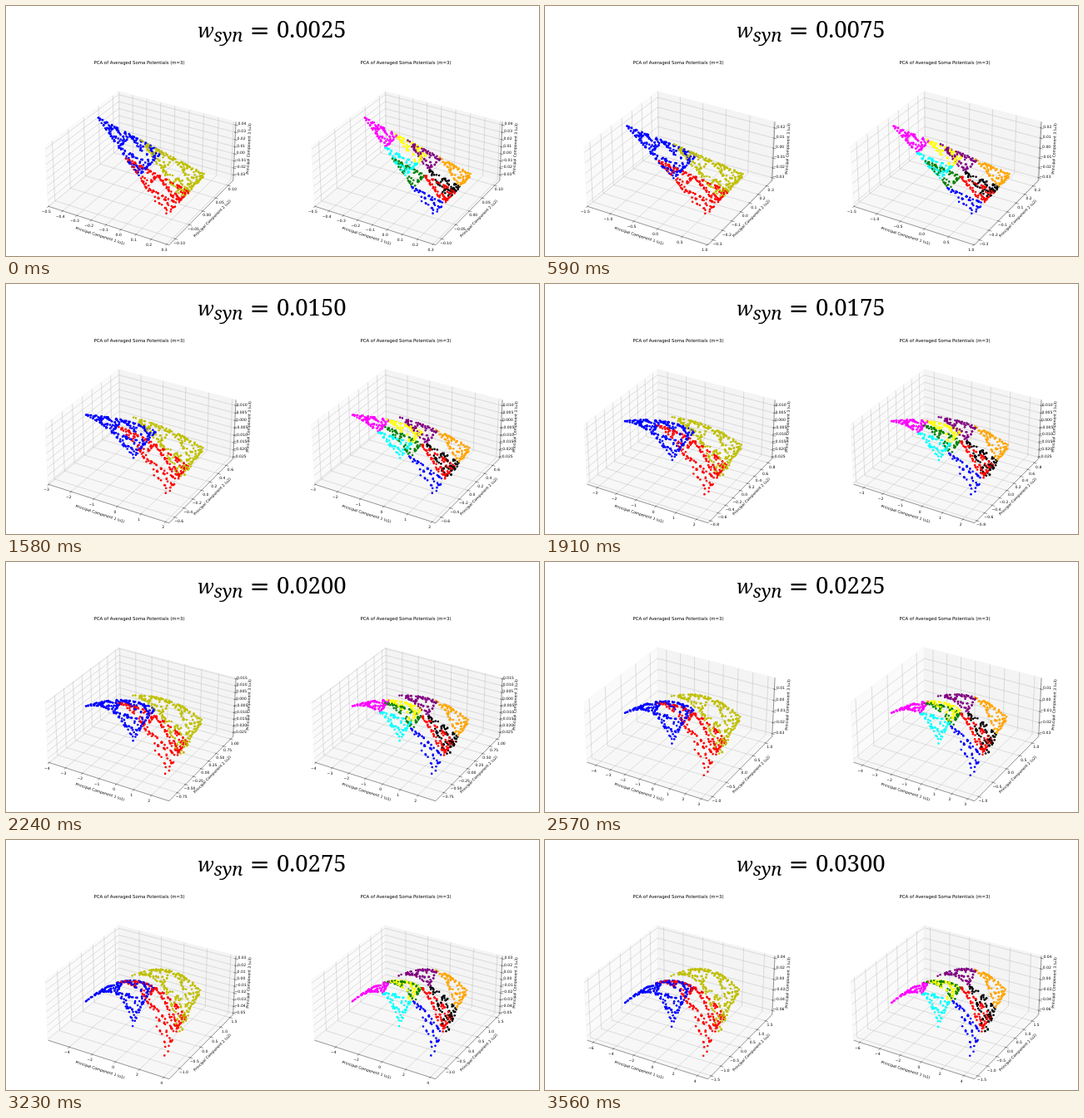
Animation of 640 by 301 pixels, one loop 3.89 s. Source, as an HTML page with a canvas:

```html
<!DOCTYPE html>
<html lang="en">
<head>
<meta charset="utf-8">
<title>Averaged potentials</title>
<style>
  html, body { margin: 0; width: 100%; height: 100%; overflow: hidden; background: #fff; }
  canvas { display: block; }
</style>
</head>
<body>
<canvas id="stage" width="640" height="301"></canvas>
<script>
const ctx = document.getElementById('stage').getContext('2d');
const LOOP = 3890, FIRST = 260, STEP = 330, STEPS = 12, PANEL = 320;
const SANS = '"DejaVu Sans", sans-serif', SERIF = '"Noto Serif", serif';
const COLORS3 = ['#00f', '#bfbf00', '#f00'];
const COLORS9 = ['#f0f', '#ff0', '#0ff', '#800080', '#ffa500', '#000', '#008000', '#f00', '#00f'];

const mix = (a, b, f) => a.map((v, i) => v + (b[i] - v) * f);
const smooth = f => f * f * (3 - 2 * f);

// Axis limits [low, high] for step n = 1..12: x and y widen, z narrows and widens again.
function limits(n) {
  const m = n - 6.5;
  return [
    [-.503 * n - 2e-7 * n ** 6, .345 * n + .0005 * n ** 3 - .03],
    [-.008 - .113 * n - .00017 * n ** 3, .12 * n + .00026 * n ** 3],
    [-.0256 - m * m * (.0009 + .00009 * m), .0135 + .00102 * m * m]
  ];
}

// The whole triangle at the start and fully bent.
const START = [[95, 146], [240, 203], [192, 254]];
const BENT = [[95, 197], [235, 182], [189, 272]];
// How far corner i of sheet s rises, and how far the edges 01, 02, 12 bulge.
const LIFT = [[0, 10, 12], [27, 0, -9], [55, 4, 0]];
const BULGE = [[6, -34], [18, -55], [0, -15]];
const EDGES = [[0, 1], [0, 2], [1, 2]];

// Each sheet is a smaller copy of the triangle, bent as a quadratic patch.
function makeSheets(n) {
  const s = smooth(Math.max(0, (n - 2.5) / 9.5));
  const bend = s ** 1.25, rise = s ** .6, settle = Math.exp(.9 - .9 * n);
  const tips = START.map((p, i) => mix(p, BENT[i], bend));
  tips[0] = [tips[0][0] + 15 * settle, tips[0][1] - 12 * settle];
  return LIFT.map((lifts, sheet) => {
    const corners = tips.map((tip, i) => {
      const [x, y] = mix(tips[sheet], tip, .6);
      return i === sheet ? tip : [x, y - lifts[i] * rise];
    });
    const controls = EDGES.map(([a, b], i) =>
      mix(corners[a], corners[b], .5).map((v, k) => v + BULGE[i][k] * bend));
    return [...corners, ...controls];
  });
}

function onSheet(sheet, [a, b, c]) {
  const weights = [a * a, b * b, c * c, 2 * a * b, 2 * a * c, 2 * b * c];
  return [0, 1].map(k => weights.reduce((sum, w, i) => sum + w * sheet[i][k], 0));
}

function seeded(seed) {
  return () => {
    seed = (seed + 0x6D2B79F5) | 0;
    let t = Math.imul(seed ^ (seed >>> 15), 1 | seed);
    t = (t + Math.imul(t ^ (t >>> 7), 61 | t)) ^ t;
    return ((t ^ (t >>> 14)) >>> 0) / 4294967296;
  };
}

// Chaos game on a triangle; the last two choices pick the colours.
function makePoints(count) {
  const random = seeded(11), points = [];
  let rest = [1, 0, 0], last = 0;
  for (let n = -20; n < count; n++) {
    const sheet = Math.floor(random() * 3);
    if (n >= 0) points.push({ sheet, sub: sheet * 3 + last, rest });
    const corner = [0, 1, 2].map(i => +(i === sheet));
    rest = mix(corner, rest, .52);
    last = sheet;
  }
  return points;
}
const points = makePoints(680);

// Box coordinates 0..1 to the stage: azimuth -60, elevation 30.
function project([u, v, w]) {
  const x = (u - .5) * 1.22, y = (v - .5) * 1.22, z = (w - .5) * .61;
  const depth = 10 - (.433 * x - .75 * y + .5 * z);
  return [163.8 + 1353 * (.866 * x + .5 * y) / depth,
          190.1 - 1353 * (-.25 * x + .433 * y + .866 * z) / depth];
}

function line(...corners) {
  ctx.beginPath();
  corners.forEach(c => ctx.lineTo(...project(c)));
  ctx.stroke();
}

function pane(color, ...corners) {
  ctx.fillStyle = color;
  line(...corners, corners[0]);
  ctx.fill();
}

function label(text, x, y, size, degrees = 0) {
  ctx.save();
  ctx.translate(x, y);
  ctx.rotate(degrees * Math.PI / 180);
  ctx.font = `${size}px ${SANS}`;
  ctx.textAlign = 'center';
  ctx.textBaseline = 'middle';
  ctx.fillStyle = '#000';
  ctx.fillText(text, 0, 0);
  ctx.restore();
}

// Round tick values, at most nine intervals.
function ticks([lo, hi]) {
  const raw = (hi - lo) / 9, power = 10 ** Math.floor(Math.log10(raw));
  const step = [1, 2, 2.5, 5, 10].find(m => m * power >= raw) * power;
  const digits = (String(+step.toPrecision(3)).split('.')[1] || '').length;
  const list = [];
  for (let k = Math.ceil(lo / step); k * step <= hi; k++) {
    const text = Math.abs(k * step).toFixed(digits);
    list.push({ at: (k * step - lo) / (hi - lo), text: (k < 0 ? '\u2212' : '') + text });
  }
  return list;
}

const AXES = [
  { grid: f => [[f, 0, 0], [f, 1, 0], [f, 1, 1]], mark: f => [[f, .01, 0], [f, -.02, 0]],
    spot: f => [f, 0, 0], shift: [-2.8, 6.8], name: [113, 277, 17.8] },
  { grid: f => [[1, f, 0], [0, f, 0], [0, f, 1]], mark: f => [[.99, f, 0], [1.02, f, 0]],
    spot: f => [1, f, 0], shift: [5, 5.2], name: [248, 256, -45.2] },
  { grid: f => [[0, 0, f], [0, 1, f], [1, 1, f]], mark: f => [[.99, 1, f], [1.02, 1, f]],
    spot: f => [1, 1, f], shift: [7.5, -1], name: [291.7, 172, -87.4] }
];

function drawBox(n) {
  const all = limits(n).map(ticks);
  ctx.lineWidth = .4;
  ctx.strokeStyle = '#e4e4e4';
  pane('#fafafa', [0, 0, 0], [0, 1, 0], [0, 1, 1], [0, 0, 1]);
  pane('#f4f4f4', [0, 1, 0], [1, 1, 0], [1, 1, 1], [0, 1, 1]);
  pane('#f7f7f7', [0, 0, 0], [1, 0, 0], [1, 1, 0], [0, 1, 0]);

  ctx.strokeStyle = '#b0b0b0';
  AXES.forEach((axis, i) => all[i].forEach(t => line(...axis.grid(t.at))));

  ctx.strokeStyle = '#000';
  AXES.forEach((axis, i) => {
    line(axis.spot(0), axis.spot(1));
    for (const t of all[i]) {
      line(...axis.mark(t.at));
      const [x, y] = project(axis.spot(t.at));
      label(t.text, x + axis.shift[0], y + axis.shift[1], 4.5);
    }
    const [x, y, angle] = axis.name;
    label(`Principal Component ${i + 1} (u${i + 1})`, x, y, 4.5, angle);
  });
}

function drawPanel(n, sheets, colorOf) {
  label('PCA of Averaged Soma Potentials (m=3)', 160, 68.5, 5.4);
  drawBox(n);
  for (const point of points) {
    const [x, y] = onSheet(sheets[point.sheet], point.rest);
    ctx.fillStyle = colorOf(point);
    ctx.beginPath();
    ctx.arc(x, y, 1.3, 0, 7);
    ctx.fill();
  }
}

function drawHeading(n) {
  const put = (text, x, y, font) => { ctx.font = font; ctx.fillText(text, x, y); };
  ctx.fillStyle = '#000';
  ctx.textAlign = 'left';
  ctx.textBaseline = 'alphabetic';
  put('w', 230, 38, `italic 24px ${SERIF}`);
  put('syn', 249.5, 43, `italic 22px ${SERIF}`);
  put('=', 292.5, 38.5, `29px ${SANS}`);
  put((n * .0025).toFixed(4), 325, 38, `27.5px ${SERIF}`);
}

function draw(n) {
  ctx.fillStyle = '#fff';
  ctx.fillRect(0, 0, 640, 301);
  drawHeading(n);
  const sheets = makeSheets(n);
  drawPanel(n, sheets, p => COLORS3[p.sheet]);
  ctx.save();
  ctx.translate(PANEL, 0);
  drawPanel(n, sheets, p => COLORS9[p.sub]);
  ctx.restore();
}

let shown = 0;
function tick() {
  const time = performance.now() % LOOP;
  const n = Math.min(STEPS, Math.max(1, 2 + Math.floor((time - FIRST) / STEP)));
  if (n !== shown) draw(shown = n);
  requestAnimationFrame(tick);
}
tick();
</script>
</body>
</html>
```
